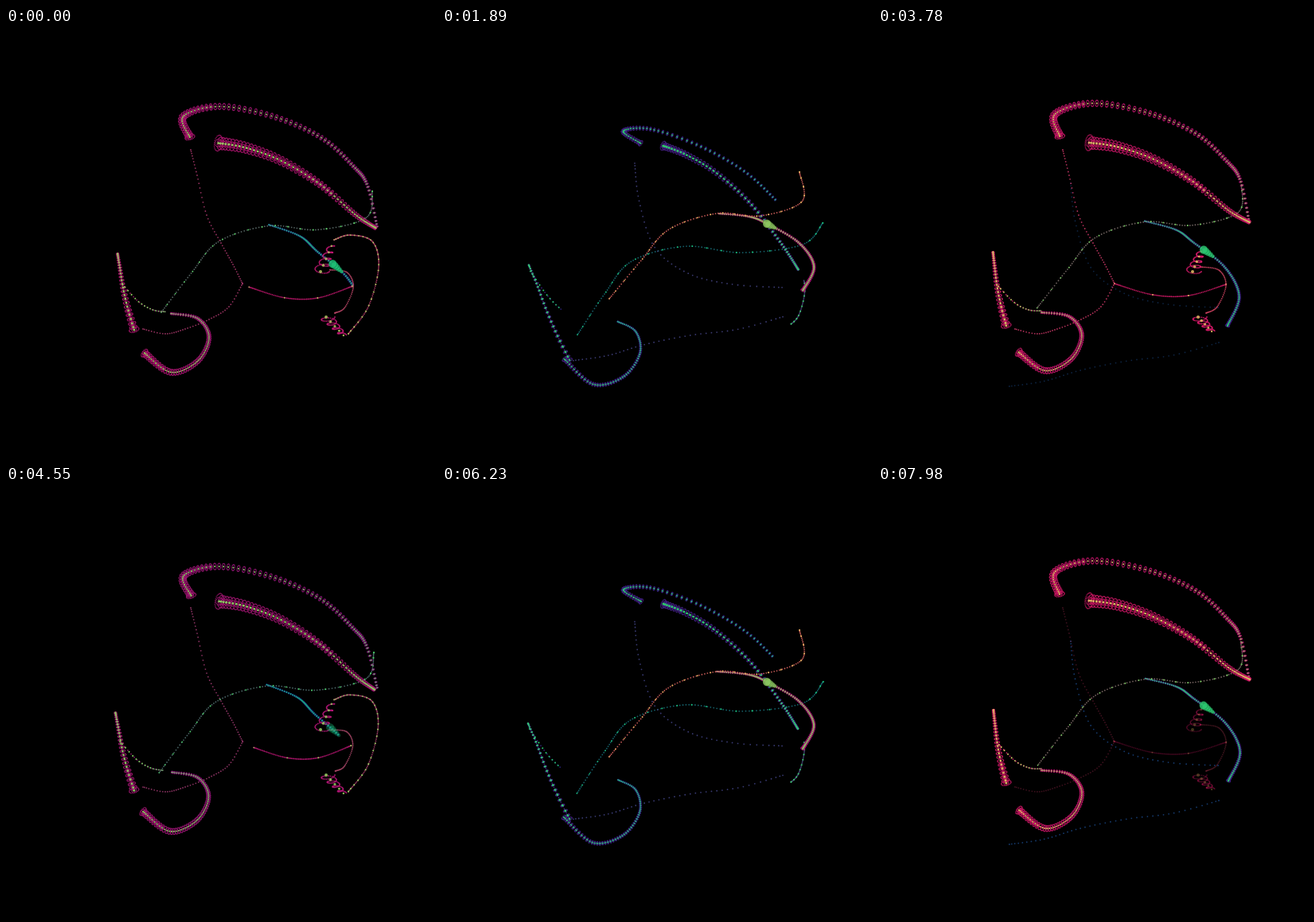
Animation, 540 px wide and 540 px high, one loop 8000 ms. Source, as an HTML page with a canvas:

```html
<!DOCTYPE html>
<html lang="en">
<head>
<meta charset="utf-8">
<title>Drifting attractor</title>
<style>
html, body { margin: 0; height: 100%; overflow: hidden; background: #000; }
canvas { display: block; width: 100vmin; height: 100vmin; }
</style>
</head>
<body>
<canvas width="540" height="540"></canvas>
<script>
const ctx = document.querySelector('canvas').getContext('2d');
const LOOP = 8000, CYCLE = 4300, STEP = 70;
const TAU = Math.PI * 2;
const clamp = (v, a = 0, b = 1) => Math.min(b, Math.max(a, v));
const mix = (a, b, k) => a + (b - a) * k;
const ramp = (v, a, b) => clamp((v - a) / (b - a));

// Drift accelerates with age; threads hold still and then snap open.
const drifting = t => t * (.4 + .6 * t);
const snapping = t => clamp(t) ** 8;

/* A strand is a curve through a few points.
   move: how far its start, end and middle travel between the ages in `over`.
   span: the visible share of the curve. life: ages between which it is lit. */
const strand = (points, options) => ({
  points: points.split(' ').map(p => p.split(',').map(Number)),
  start: [0, 0], end: [0, 0], bend: [0, 0], over: [3680, 6230], life: [2550, 6900],
  lag: 2600, skew: 0, blend: 0, cores: 0, fine: 0, width: 0, size: 1.1, warp: 1,
  ease: drifting, span: () => [0, 1], ...options
});

const spine = strand('345,233 385,237 408,246 448,270 467,300 453,330', {
  start: [-15, 14], end: [-21, 65], over: [1930, 4300], life: [900, 5900],
  lag: 0, cores: 85, fine: 130, width: 2,
  span: a => [.4 * (1 - ramp(a, 950, 1930)), 1 - .35 * ramp(a, 3780, 4300) - .35 * ramp(a, 4300, 5250)]
});

const strands = [
  spine,
  // bridge
  strand('210,340 250,292 285,253 345,233 400,236 452,218 449,181', {
    start: [-15, 17], end: [11, 24], bend: [-13, -5], over: [1930, 4300], life: [1800, 6300],
    lag: 1400, blend: .5, fine: 110, cores: 24
  }),
  // crest
  strand('466,242 455,190 438,166 400,132 340,106 270,94 222,108 228,136', {
    start: [0, 55], end: [22, 9], bend: [-30, 15], skew: 700, cores: 75, fine: 75, width: 5,
    span: a => [.3 * ramp(a, 5400, 6230) + .15 * ramp(a, 6230, 6960), mix(.72, 1, ramp(a, 2660, 3500))]
  }),
  // wing
  strand('467,243 440,228 395,192 345,164 300,149 265,144', {
    start: [-20, 62], end: [13, 4], bend: [0, -9], cores: 56, fine: 60, width: 8, size: 1.5, warp: 1.3,
    span: a => [.15 * ramp(a, 6230, 6960), mix(.28, 1, ramp(a, 2660, 3500))]
  }),
  // stem
  strand('145,281 147,300 150,325 155,350 161,373', {
    start: [-37, 17], end: [-1, 45], cores: 26, fine: 50, width: 5, size: 1.5, warp: 1.3,
    span: a => [0, mix(.1, 1, ramp(a, 2660, 3500))]
  }),
  // tail
  strand('205,355 190,354 172,345 152,325', {
    start: [-40, 10], end: [-42, -20], life: [2550, 6350], skew: 700, cores: 16, fine: 18,
    span: a => [.35 * ramp(a, 5200, 5900), 1]
  }),
  // bowl
  strand('205,357 240,362 256,385 243,415 210,430 177,407', {
    start: [16, 12], end: [-24, 9], bend: [-8, 14], skew: 500, cores: 62, fine: 60, width: 4.5,
    span: a => [.25 * ramp(a, 6230, 6960), mix(.6, 1, ramp(a, 2660, 3500))]
  }),
  // upper thread
  strand('232,153 240,185 252,235 270,270 285,297 297,321', {
    start: [10, 7], end: [130, -5], bend: [-45, 30], over: [3780, 5490], life: [3760, 7980],
    ease: snapping, sink: 35, blend: .2, fine: 46
  }),
  // lower thread
  strand('172,378 200,384 225,378 255,366 280,350 297,321', {
    start: [-7, 27], end: [131, 29], bend: [-20, -22], over: [3780, 5490], life: [3760, 7980],
    ease: snapping, sink: 45, blend: .2, fine: 46
  }),
  // keel
  strand('297,321 345,335 390,336 437,322', {
    start: [38, 20], end: [-10, 11], over: [3780, 5250], life: [3760, 5300], lag: 2900, cores: 4, fine: 80
  }),
  // rim
  strand('412,266 432,260 460,268 468,300 455,350 430,384', {
    start: [0, 22], end: [0, -3], bend: [-6, 6], over: [4300, 5490], life: [4200, 6300],
    lag: 2800, blend: .25, cores: 30, fine: 110,
    span: a => [.55 * ramp(a, 5490, 6230), 1 - .1 * ramp(a, 5490, 6230)]
  }),
  // inner rim
  strand('405,300 428,304 437,323 426,350 412,358', {
    start: [8, 17], end: [4, 0], bend: [-10, 0], over: [3780, 5250], life: [3760, 5250], lag: 2900, blend: .3, fine: 52
  }),
  // remnants of the previous generation
  ...['167,236 182,247 213,260', '463,225 440,166 408,152 380,181', '325,446 362,409 388,364'].map(points =>
    strand(points, { life: [850, 1000], lag: -3000, cores: 18, fine: 28 }))
];

const coils = [
  { x: 395, y: 306, dx: 12, dy: -28 },
  { x: 402, y: 363, dx: 19, dy: 20 }
];

// Halo and core colours run through the same cycle of hues.
const shades = [
  { w: 0, core: [235, 180, 95], halo: [230, 28, 100] },
  { w: 1100, core: [220, 178, 98], halo: [210, 25, 105] },
  { w: 1700, core: [150, 195, 95], halo: [180, 22, 115] },
  { w: 2650, core: [100, 205, 95], halo: [125, 25, 125] },
  { w: 3650, core: [45, 200, 110], halo: [70, 35, 140] },
  { w: 4500, core: [25, 190, 120], halo: [25, 38, 130] }
];

function palette(w, blend = 0) {
  const i = clamp(shades.findIndex(s => s.w > w) - 1, 0, 4);
  const [a, b] = w > 4500 ? [shades[5], shades[5]] : [shades[i], shades[i + 1]];
  const k = ramp(w, a.w, b.w || 1);
  const core = a.core.map((v, j) => mix(v, b.core[j], k));
  const halo = a.halo.map((v, j) => mix(mix(v, b.halo[j], k), core[j], blend));
  return { core: `rgb(${core.map(Math.round)})`, halo: `rgb(${halo.map(Math.round)})` };
}

const glow = ([from, to], age) => ramp(age, from - 120, from) * (1 - ramp(age, to, to + 250));
const progress = (s, age) => s.ease(ramp(age, ...s.over) + (age - clamp(age, ...s.over)) / (s.over[1] - s.over[0]));

function pose(s, age) {
  const k = progress(s, age), last = s.points.length - 1;
  const sunk = (s.sink || 0) * ramp(age, 5490, 7980);
  return s.points.map((p, i) => p.map((v, d) => {
    const u = i / last;
    return v + k * (mix(s.start[d], s.end[d], u) + s.bend[d] * Math.sin(Math.PI * u)) + d * sunk;
  }));
}

// Catmull-Rom position and heading
function along(points, u) {
  const last = points.length - 1, f = clamp(u) * last;
  const i = Math.min(last - 1, Math.floor(f)), t = f - i;
  const [p, q, r, s] = [-1, 0, 1, 2].map(k => points[clamp(i + k, 0, last)]);
  const axis = d => {
    const b = r[d] - p[d], c = 2 * p[d] - 5 * q[d] + 4 * r[d] - s[d];
    const e = 3 * q[d] - p[d] - 3 * r[d] + s[d];
    return [q[d] + (b * t + c * t * t + e * t ** 3) / 2, b + 2 * c * t + 3 * e * t * t];
  };
  const [x, dx] = axis(0), [y, dy] = axis(1);
  return { x, y, angle: Math.atan2(dy, dx) };
}

function dot(x, y, r) {
  ctx.beginPath();
  ctx.arc(x, y, r, 0, TAU);
  ctx.fill();
}

// A dotted ellipse standing across the direction of travel
function ring({ x, y, angle }, r, depth = .5) {
  const n = Math.ceil(r * 2.2) + 5, cos = Math.cos(angle), sin = Math.sin(angle);
  for (let i = 0; i < n; i++) {
    const a = TAU * i / n, along = r * depth * Math.cos(a), across = r * Math.sin(a);
    dot(x + along * cos - across * sin, y + along * sin + across * cos, .75);
  }
}

function drawStrand(s, age) {
  const alpha = glow(s.life, age);
  if (!alpha) return;
  const points = pose(s, age), [from, to] = s.span(age);
  const shade = u => palette(age - s.lag + s.skew * (1 - u), s.blend);
  const swell = s === spine ? 1 : ramp(age, 2300, 3600) * (1 - .7 * ramp(age, 5000, 7000));
  const each = (count, warp, paint) => {
    for (let i = 0; i < count; i++) {
      const u = (i / (count - 1)) ** warp;
      if (u >= from && u <= to) paint(along(points, u), u);
    }
  };
  ctx.globalAlpha = alpha * .85;
  each(s.fine, 1, (p, u) => {
    ctx.fillStyle = shade(u).halo;
    dot(p.x, p.y, .9);
  });
  if (s.width) each(s.cores, s.warp, (p, u) => {
    ctx.fillStyle = shade(u).halo;
    const r = s.width * swell * mix(.25, 1, u) * (u === 1 ? 1.25 : 1);
    ring(p, r);
    if (r > 4) ring(p, r * .5, .8);
  });
  ctx.globalAlpha = alpha;
  each(s.cores, s.warp, (p, u) => {
    ctx.fillStyle = shade(u).core;
    dot(p.x, p.y, s.size * mix(.75, 1, u));
  });
}

function drawCoil({ x, y, dx, dy }, age) {
  const alpha = glow([3760, 5600], age);
  if (!alpha) return;
  const { core, halo } = palette(age - 2800), turns = 4;
  const n = turns * 22, spread = mix(.9, 1.15, ramp(age, 3780, 4300));
  ctx.globalAlpha = alpha * .9;
  for (let i = 0; i < n; i++) {
    const k = i / n, a = k * turns * TAU, r = mix(11, 4, Math.sqrt(k));
    ctx.fillStyle = halo;
    dot(x + dx * k * spread + r * Math.cos(a), y + dy * k * spread + r * .4 * Math.sin(a), .9);
  }
  ctx.fillStyle = core;
  for (let k = 0; k <= 1; k += 1 / turns) dot(x + dx * k * spread, y + dy * k * spread, mix(2, 1.2, k));
}

// The bright cluster where new points enter the spine
function drawKnot(age) {
  const alpha = glow([900, 4400], age);
  if (!alpha) return;
  const points = pose(spine, age), head = .4 + .1 * clamp(progress(spine, age));
  ctx.globalAlpha = alpha * .85;
  ctx.fillStyle = palette(age).core;
  ctx.strokeStyle = 'rgba(0,0,0,.35)';
  ctx.lineWidth = .7;
  for (let i = 4; i >= 0; i--) {
    const p = along(points, head + i * .013);
    dot(p.x, p.y, 5.2 - i * .7);
    ctx.stroke();
  }
}

function frame(now) {
  const time = Math.floor(now % LOOP / STEP) * STEP;
  const phase = time % CYCLE;
  ctx.globalAlpha = 1;
  ctx.fillStyle = '#000';
  ctx.fillRect(0, 0, 540, 540);
  for (const age of [phase + CYCLE, phase]) {
    strands.forEach(s => drawStrand(s, age));
    coils.forEach(c => drawCoil(c, age));
    drawKnot(age);
  }
}

const began = performance.now();
function tick() {
  frame(performance.now() - began);
  requestAnimationFrame(tick);
}
tick();
</script>
</body>
</html>
```
